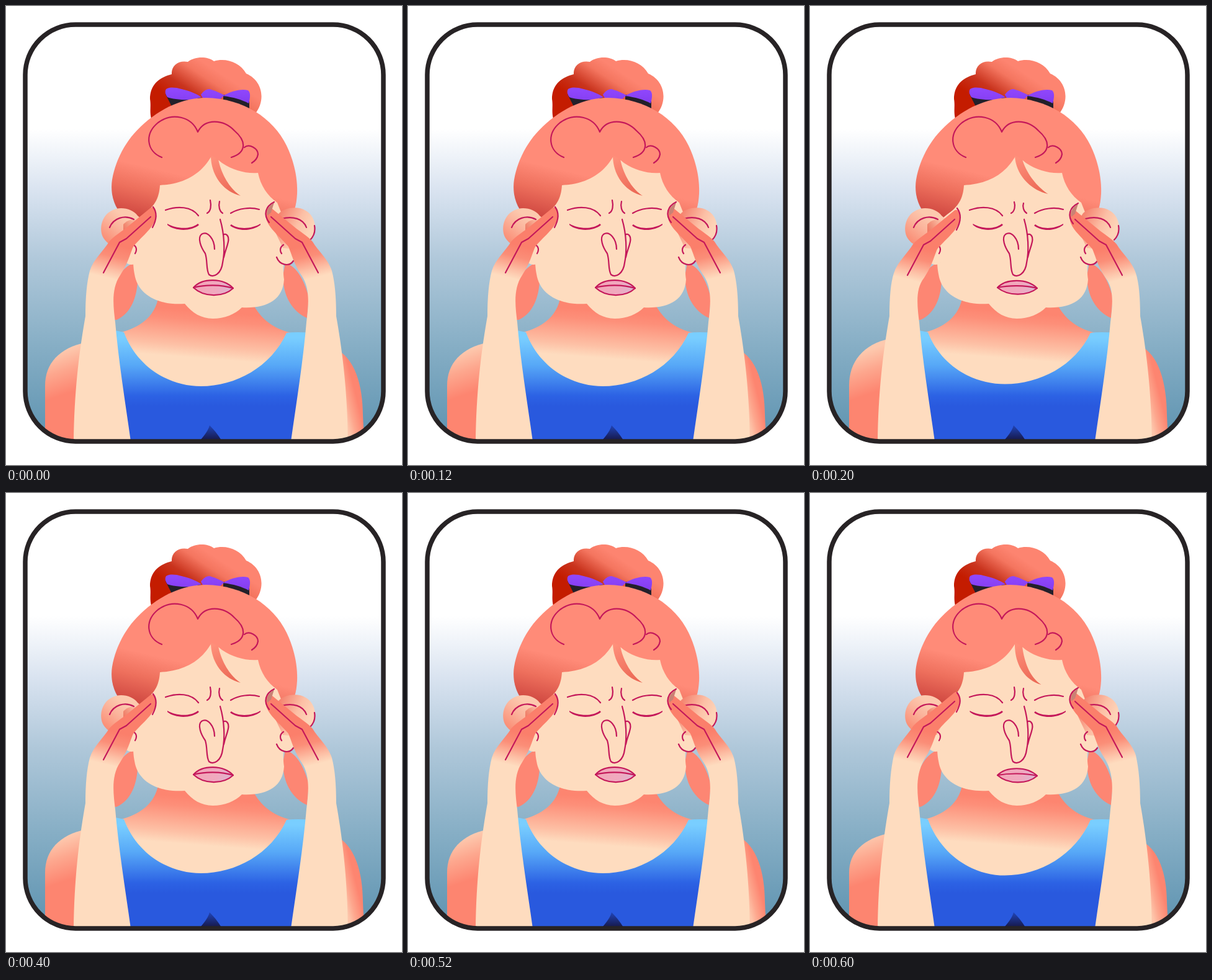
An HTML page that plays this animation: 638x740 px, repeating every 800 ms.

```html
<!DOCTYPE html>
<html lang="en">
<head>
<meta charset="utf-8">
<title>Headache</title>
<style>
  html, body { margin: 0; width: 100%; height: 100%; overflow: hidden; background: #fff; }
  svg { display: block; width: 100vw; height: 100vh; }
  .line { fill: none; stroke: #c4185a; stroke-width: 2.2; stroke-linecap: round; stroke-linejoin: round; }
  .ink { fill: #c4185a; }
  .skin { fill: #fedcbf; }
</style>
</head>
<body>
<svg viewBox="0 0 638 740">
  <defs>
    <clipPath id="card"><rect x="31" y="30" width="577" height="672" rx="81"/></clipPath>
    <linearGradient id="sky" gradientUnits="userSpaceOnUse" x1="0" y1="198" x2="0" y2="700">
      <stop offset="0" stop-color="#fff"/>
      <stop offset=".2" stop-color="#d9e3f0"/>
      <stop offset=".42" stop-color="#b0c8da"/>
      <stop offset=".7" stop-color="#86aec5"/>
      <stop offset="1" stop-color="#5e93b0"/>
    </linearGradient>
    <linearGradient id="bun" gradientUnits="userSpaceOnUse" x1="254" y1="140" x2="296" y2="76">
      <stop offset="0" stop-color="#c41c00"/>
      <stop offset=".35" stop-color="#c9341e"/>
      <stop offset=".75" stop-color="#f4755f"/>
      <stop offset="1" stop-color="#fd8470"/>
    </linearGradient>
    <linearGradient id="hair" gradientUnits="userSpaceOnUse" x1="222" y1="258" x2="203" y2="338">
      <stop offset="0" stop-color="#ff8b78"/>
      <stop offset=".45" stop-color="#ee705d"/>
      <stop offset="1" stop-color="#cf4740"/>
    </linearGradient>
    <linearGradient id="strand" gradientUnits="userSpaceOnUse" x1="335" y1="245" x2="372" y2="306">
      <stop offset="0" stop-color="#fe8f7a"/>
      <stop offset="1" stop-color="#ea6552"/>
    </linearGradient>
    <linearGradient id="bow" gradientUnits="userSpaceOnUse" x1="0" y1="132" x2="0" y2="156">
      <stop offset="0" stop-color="#9148ff"/>
      <stop offset="1" stop-color="#843df0"/>
    </linearGradient>
    <linearGradient id="earL" gradientUnits="userSpaceOnUse" x1="156" y1="378" x2="188" y2="338">
      <stop offset="0" stop-color="#fa8a72"/>
      <stop offset=".6" stop-color="#fbb39b"/>
      <stop offset="1" stop-color="#fcc9ae"/>
    </linearGradient>
    <linearGradient id="earShade" gradientUnits="userSpaceOnUse" x1="190" y1="360" x2="214" y2="346">
      <stop offset="0" stop-color="#ef7d67"/>
      <stop offset="1" stop-color="#ef7d67" stop-opacity="0"/>
    </linearGradient>
    <linearGradient id="earR" gradientUnits="userSpaceOnUse" x1="440" y1="340" x2="488" y2="364">
      <stop offset="0" stop-color="#f58672"/>
      <stop offset=".6" stop-color="#fcc0a6"/>
      <stop offset="1" stop-color="#fdd3b7"/>
    </linearGradient>
    <linearGradient id="neck" gradientUnits="userSpaceOnUse" x1="324" y1="492" x2="318" y2="568">
      <stop offset="0" stop-color="#fd8570"/>
      <stop offset=".2" stop-color="#fd8f79"/>
      <stop offset=".75" stop-color="#fdc0a5"/>
      <stop offset="1" stop-color="#fedcbf"/>
    </linearGradient>
    <linearGradient id="shirt" gradientUnits="userSpaceOnUse" x1="0" y1="535" x2="0" y2="645">
      <stop offset="0" stop-color="#79ceff"/>
      <stop offset=".4" stop-color="#57a8f7"/>
      <stop offset=".85" stop-color="#2c62e4"/>
      <stop offset="1" stop-color="#2959de"/>
    </linearGradient>
    <linearGradient id="fold" gradientUnits="userSpaceOnUse" x1="0" y1="674" x2="0" y2="699">
      <stop offset="0" stop-color="#2148c0"/>
      <stop offset="1" stop-color="#171a4e"/>
    </linearGradient>
    <linearGradient id="shoulderL" gradientUnits="userSpaceOnUse" x1="84" y1="558" x2="106" y2="622">
      <stop offset="0" stop-color="#fdc9ae"/>
      <stop offset=".45" stop-color="#fda78e"/>
      <stop offset="1" stop-color="#fd8570"/>
    </linearGradient>
    <linearGradient id="shoulderR" gradientUnits="userSpaceOnUse" x1="544" y1="650" x2="568" y2="644">
      <stop offset="0" stop-color="#fdc5aa"/>
      <stop offset=".4" stop-color="#fda78e"/>
      <stop offset="1" stop-color="#fd8570"/>
    </linearGradient>
    <linearGradient id="arm" gradientUnits="userSpaceOnUse" x1="180" y1="386" x2="167" y2="439">
      <stop offset="0" stop-color="#fb7f6b"/>
      <stop offset=".35" stop-color="#fb8e78"/>
      <stop offset=".75" stop-color="#fdc0a6"/>
      <stop offset="1" stop-color="#fedcbf"/>
    </linearGradient>
    <linearGradient id="lips" gradientUnits="userSpaceOnUse" x1="302" y1="445" x2="366" y2="460">
      <stop offset="0" stop-color="#f3a6b6"/>
      <stop offset=".6" stop-color="#f0a9bf"/>
      <stop offset="1" stop-color="#d8b6d2"/>
    </linearGradient>
  </defs>

  <g clip-path="url(#card)">
    <rect x="27" y="26" width="585" height="680" fill="url(#sky)"/>

    <path fill="#fd8673" d="M206 414C182 424 166 452 173 506H178C199 497 210 474 212 445ZM447 430C444 458 456 490 485 503L488 470C480 440 468 420 450 414Z"/>

    <path id="shoulderLeft" fill="url(#shoulderL)"/>
    <path id="shoulderRight" fill="url(#shoulderR)"/>
    <path fill="url(#neck)" d="M246 466C242 496 222 516 186 526V640H460V527C430 520 410 504 398 480Z"/>
    <path id="top" fill="url(#shirt)"/>
    <path fill="url(#fold)" d="M313 700C320 692 326 684 328 676C334 682 341 690 347 700Z"/>

    <path fill="url(#bun)" d="M234 182C231 168 234 162 232 150C232 126 248 115 267 110C266 96 278 87 293 90C305 81 324 81 335 89C354 83 377 91 387 109C413 120 419 151 402 173L330 195Z"/>
    <path fill="#23202a" d="M257 142L316 148L300 162H267ZM350 143L392 150V166L350 160Z"/>
    <path fill="url(#bow)" d="M257 136C258 131 270 130 283 134C296 137 308 142 315 147L300 151C285 152 268 150 260 147C257 143 256 139 257 136ZM314 143C318 137 325 132 331 135C339 137 346 141 352 144L345 150H318ZM350 145C361 138 378 133 390 136C395 140 393 150 391 157C380 151 366 147 350 145Z"/>

    <path fill="url(#hair)" d="M188 338C172 322 168 299 171 280C176 250 191 223 206 206C236 172 278 148 322 148C382 149 430 180 452 225C465 252 470 280 469 303C468 322 464 334 456 344L320 390Z"/>
    <path class="skin" d="M331 242C314 272 286 287 248 289C247 306 242 322 221 336L204 350V398C205 412 205 422 207 432C212 466 246 483 288 480C300 495 315 504 333 504C352 504 369 497 380 486C420 488 446 474 448 441C446 428 447 418 448 408L454 360L437 317C421 306 410 289 406 269C383 271 358 262 343 249Z"/>
    <path id="lock" fill="url(#strand)"/>

    <ellipse class="skin" cx="202" cy="401" rx="14" ry="16"/>
    <ellipse class="skin" cx="450" cy="400" rx="15" ry="17"/>
    <path fill="url(#earL)" d="M212 338C204 327 184 322 170 330C154 338 149 360 157 374C164 386 182 393 204 390L226 350Z"/>
    <path fill="url(#earShade)" d="M189 368V352C196 344 206 343 214 346L200 366Z"/>
    <path fill="url(#earR)" d="M440 334C450 325 470 322 483 330C499 339 502 362 493 374C486 386 470 394 446 390L428 352Z"/>
    <path class="line" d="M167 357C173 342 191 336 206 344M444 343C462 338 479 343 484 357M497 354C499 365 494 373 490 377M436 405C441 418 456 421 463 411M205 385C211 388 211 394 208 399M447 385C441 389 441 395 444 399"/>

    <path class="line" d="M251 244C226 234 223 206 245 188C268 171 299 178 309 203C320 181 350 182 368 201C389 219 386 237 363 244M384 228C392 221 406 230 406 239C405 246 401 250 396 253"/>
    <path class="line" d="M257 329C276 322 299 323 310 338M362 334C375 326 394 324 408 328"/>
    <path id="frown" class="line"/>
    <path id="eyes" class="ink"/>
    <path class="line" d="M345 344C352 368 353 395 349 414C347 431 335 439 327 433C322 424 325 411 321 399C314 389 308 374 315 368C325 362 336 376 336 392M350 369C354 366 360 370 358 380C356 390 353 394 351 405"/>
    <path id="mouth" class="line" style="fill:url(#lips)"/>
    <path id="bite" class="line"/>

    <g>
      <path class="armShape" fill="url(#arm)"/>
      <path class="line armLine"/>
    </g>
    <g transform="matrix(-1 0 0 1 660 0)">
      <path class="armShape" fill="url(#arm)"/>
      <path class="line armLine"/>
    </g>
    <path id="nail" fill="#c98274"/>
    <path id="nailLeft" class="line"/>
    <path id="nailRight" class="line"/>
  </g>
  <rect x="31" y="30" width="577" height="672" rx="81" fill="none" stroke="#272325" stroke-width="7.5"/>
</svg>
<script>
const $ = id => document.getElementById(id);
const draw = (id, d) => $(id).setAttribute("d", d);
const drawAll = (cls, d) => document.querySelectorAll(cls).forEach(el => el.setAttribute("d", d));

const HOLD = 200;
const poses = [0, -1, 0, 1]; // breath in is -1, breath out is 1

function pose(k) {
  const rise = Math.max(0, -k), sink = Math.max(0, k);

  const sh = 6 * k;
  draw("shoulderLeft", `M130 ${542 + sh}C85 ${551 + sh} 63 ${577 + sh / 2} 63 612V702H140Z`);
  draw("shoulderRight", `M530 ${553 + sh}C562 ${566 + sh} 575 ${612 + sh / 2} 575 660L577 702H520Z`);

  const low = 613 + 3.5 * k;
  draw("top", `M165 522Q178 523 190 526C211 ${582 + 2 * k} 262 ${low} 314 ${low}C370 ${low} 427 ${582 + 2 * k} 452 527Q466 525 495 527V702H165Z`);

  const tx = 378 - 5.5 * k, ty = 306 + 3 * k;
  draw("lock", `M330 241C${330 - k} 270 ${347 - 6 * k} ${298 + 2 * k} ${tx} ${ty}C${361 - 7 * k} ${295 + 2 * k} ${347 - 2 * k} 272 342 247Z`);

  const top = 313 + 3 * rise;
  draw("frown", `M329 ${top}C331 322 330 331 324 334M344 ${top + 2}C342 323 344 331 349 334`);

  const a = 260 - 2.5 * k, b = 410 + 2 * k;
  draw("eyes", `M${a} 351C${a + 13} 359 297 361 309 351L311 353C298 364 ${a + 12} 363 ${a} 353Z` +
    `M363 352C375 361 ${b - 13} 359 ${b} 351V353C${b - 13} 363 374 364 361 354Z`);

  const lip = rise + 2.5 * sink, m = 454 + sink;
  draw("mouth", `M302 ${m}C316 ${438 + lip} 350 ${438 + lip} 366 ${m + 1}C350 ${470 - 2 * rise} 319 ${470 - 2 * rise} 302 ${m}Z`);
  draw("bite", `M302 ${m}C321 ${449 + lip} 346 ${449 + lip} 366 ${m + 1}`);

  const h = -4 * k;
  const y = n => n + h;
  $("arm").setAttribute("gradientTransform", `translate(0 ${h})`);
  drawAll(".armShape", `M109 702C110 620 118 556 128 500C128 470 130 446 135 ${y(427)}` +
    `C141 ${y(408)} 158 ${y(394)} 166 ${y(380)}C174 ${y(371)} 184 ${y(365)} 192 ${y(359)}L231 ${y(327)}` +
    `C238 ${y(320)} 243 ${y(330)} 241 ${y(342)}C238 ${y(358)} 216 ${y(374)} 205 ${y(388)}` +
    `C199 ${y(402)} 197 ${y(414)} 184 ${y(434)}C169 456 173 485 176 510C181 570 192 638 201 702Z`);
  drawAll(".armLine", `M157 ${y(430)}L183 ${y(381)}L194 ${y(375)}L233 ${y(340)}`);

  const ny = 316 + h / 2;
  draw("nailLeft", `M237 ${ny + 8}C243 ${ny + 16} 244 ${y(342)} 236 ${y(357)}`);
  draw("nailRight", `M432 ${ny}C418 ${ny + 7} 414 ${ny + 20} 424 ${ny + 33}`);
  draw("nail", `M432 ${ny + 1}C422 ${ny + 7} 419 ${ny + 14} 421 ${ny + 22}L427 ${ny + 17}Z`);
}

function tick() {
  pose(poses[Math.floor((performance.now() - start) / HOLD) % poses.length]);
  requestAnimationFrame(tick);
}

const start = performance.now();
tick();
</script>
</body>
</html>
```
